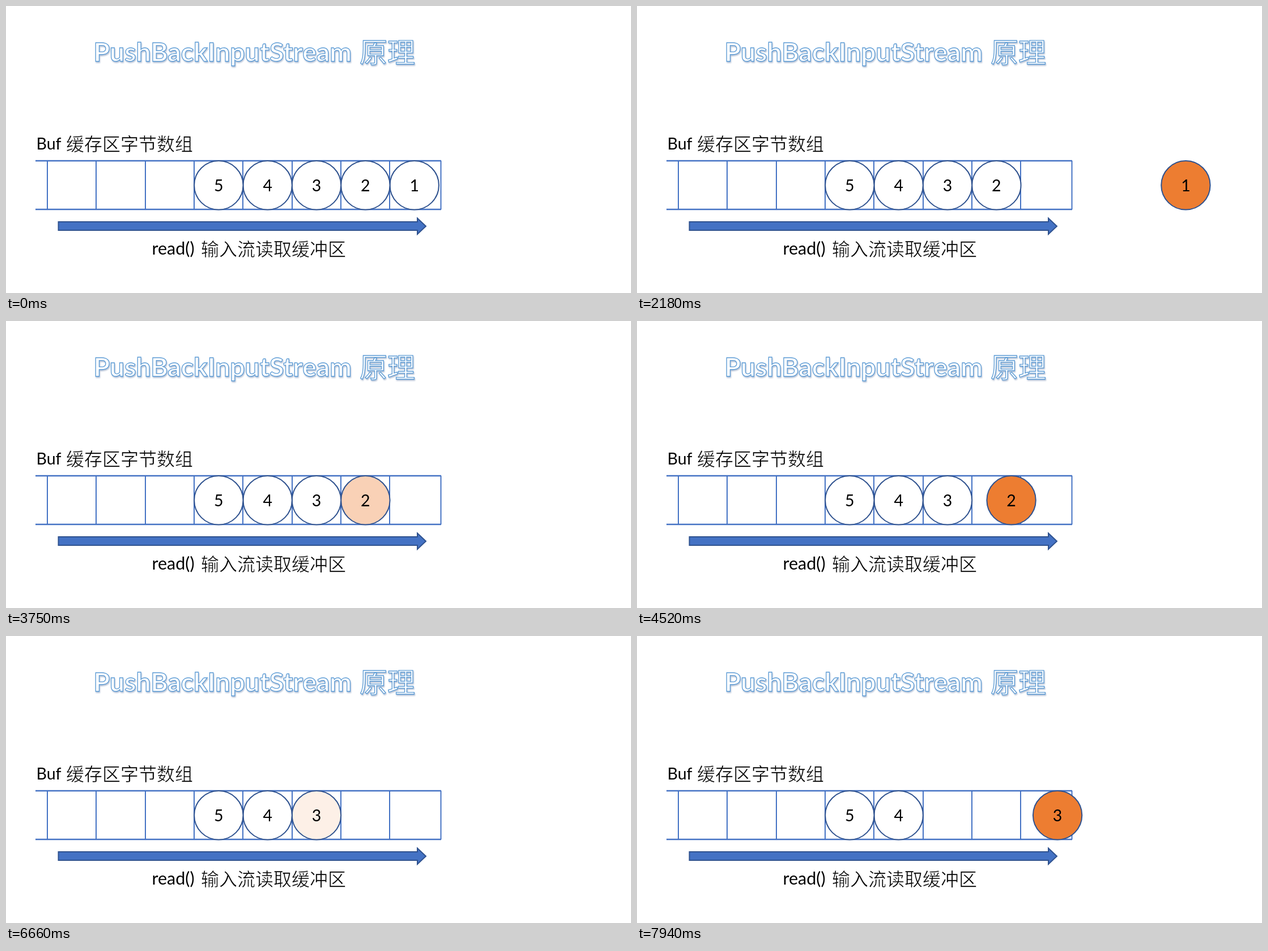
An HTML page that plays this animation: 1103x508 px, repeating every 8000 ms.

```html
<!DOCTYPE html>
<html lang="zh">
<head>
<meta charset="utf-8">
<style>
html, body { margin: 0; width: 100%; height: 100%; overflow: hidden; background: #fff; }
svg { display: block; width: 1103px; height: 508px; }
text { font-family: Lato, "Noto Sans CJK SC", "Noto Sans CJK", sans-serif; font-size: 28.5px; }
/* the thin white stroke lightens the strokes of the glyphs */
.zh { font-family: "Noto Sans CJK SC", "Noto Sans CJK", sans-serif; font-size: 32px; font-weight: 300; stroke: #fff; stroke-width: .6px; }
.title text { font-size: 46.3px; font-weight: 700; fill: #fff; stroke: #5b9bd5; stroke-width: 1.3px; }
.title .zh { font-size: 49px; font-weight: 500; }
.title { filter: drop-shadow(1px 2px 1px rgba(80, 110, 160, .45)); }
.grid { fill: none; stroke: #4472c4; stroke-width: 2px; }
.outline { stroke: #2f528f; stroke-width: 2px; }
</style>
</head>
<body>
<svg viewBox="0 0 1103 508">
  <g class="title">
    <text x="154.5" y="98">PushBackInputStream</text>
    <text class="zh" x="624" y="100">原理</text>
  </g>
  <text x="53.5" y="254">Buf</text>
  <text class="zh" x="106" y="256">缓存区字节数组</text>
  <path class="grid" id="cells"/>
  <path class="grid" d="M52 274H768M52 360H768" style="stroke-width:2.5px"/>
  <path class="outline" fill="#4472c4" d="M92.5 382H726V375.5L741 389.7L726 404V397H92.5Z"/>
  <text x="257.5" y="440" style="font-size:30.5px">read()</text>
  <text class="zh" x="344" y="442">输入流读取缓冲区</text>
  <g id="balls"></g>
</svg>
<script>
const LOOP = 8000, FILL = 790, MOVE = 1170, FADE = 800, LEAD = 825;
const END_X = 992;
const MOVE_STARTS = [1255, 4297, 7394];
const NS = 'http://www.w3.org/2000/svg';

const clamp = v => Math.min(1, Math.max(0, v));
const ease = u => u < .5 ? 2 * u * u : 1 - 2 * (1 - u) ** 2;
const mix = (from, to, u) => from + (to - from) * u;

function add(parent, tag, attrs, text = '') {
  const node = document.createElementNS(NS, tag);
  for (const key in attrs) node.setAttribute(key, attrs[key]);
  node.textContent = text;
  return parent.appendChild(node);
}

const lines = Array.from({ length: 8 }, (_, i) => Math.round(73 + 86.3 * i)).concat(767.5);
document.getElementById('cells').setAttribute('d', lines.map(x => `M${x} 274V360`).join(''));

const layer = document.getElementById('balls');
const balls = [1, 2, 3, 4, 5].map(n => {
  const group = add(layer, 'g', {});
  const disc = add(group, 'circle', { r: 43.2, class: 'outline', fill: '#fff' });
  add(group, 'text', { y: 10.5, 'text-anchor': 'middle' }, n);
  return { group, disc, x: 720.7 - 86.35 * (n - 1), start: MOVE_STARTS[n - 1] ?? Infinity };
});

function draw(t) {
  for (const { group, disc, x, start } of balls) {
    const tint = clamp((t - start + LEAD) / FILL);
    const travel = ease(clamp((t - start) / MOVE));
    const fade = clamp((t - start - MOVE) / FADE);
    const rgb = [237, 125, 49].map(c => Math.round(mix(255, c, tint)));
    disc.setAttribute('fill', `rgb(${rgb})`);
    group.setAttribute('transform', `translate(${mix(x, END_X, travel)} 317.3)`);
    group.setAttribute('opacity', 1 - fade);
  }
}

const origin = performance.now();
function tick() {
  draw((performance.now() - origin) % LOOP);
  requestAnimationFrame(tick);
}
tick();
</script>
</body>
</html>
```
